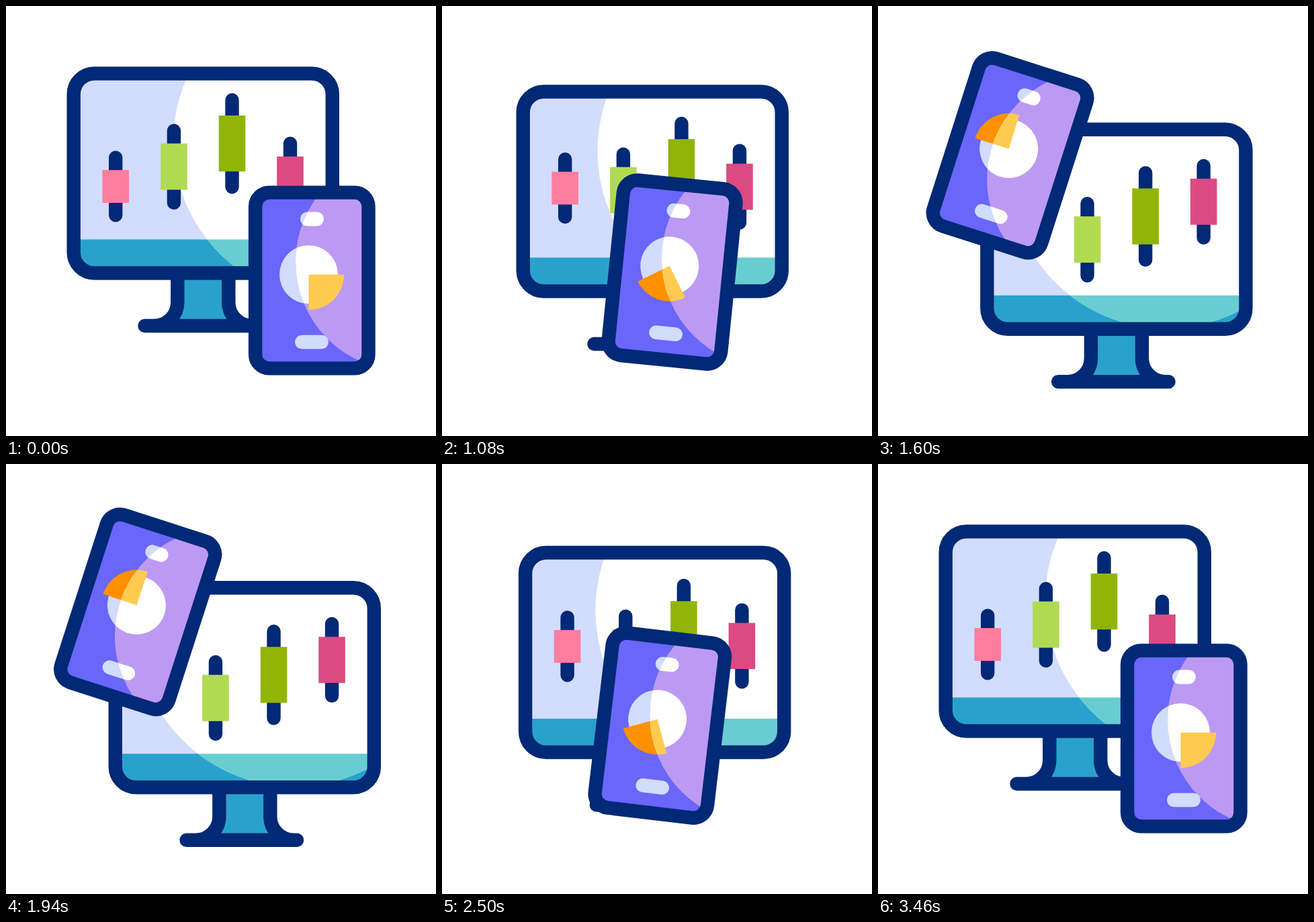
These frames come from a looping animation (640x640 px, 3600 ms). An HTML page:

```html
<!DOCTYPE html>
<html lang="en">
<head>
<meta charset="utf-8">
<title>Trading devices</title>
<style>
  html, body { margin: 0; width: 100%; height: 100%; overflow: hidden; background: #fff; }
  svg { display: block; width: 100vw; height: 100vh; }
  .line { fill: none; stroke: #022975; stroke-width: 20.4; stroke-linecap: round; }
</style>
</head>
<body>
<svg id="stage" viewBox="0 0 640 640"></svg>
<script>
const LOOP = 3600;
const stage = document.getElementById('stage');

// Each surface is drawn twice: plain, and again in lit colours inside a round spot.
const plain = { wall: '#d2dcfd', bar: '#28a2cc', screen: '#6a66f9', pale: '#d2dcfd', slice: '#ff9100' };
const lit = { wall: '#fff', bar: '#68cdd0', screen: '#bc9af3', pale: '#fff', slice: '#fdcb50' };

const wall = c => `<g class="monitor">
  <rect x="101" y="101" width="385" height="296" rx="30" fill="${c.wall}"/>
  <rect x="110" y="347.5" width="366" height="41" fill="${c.bar}"/></g>`;

const screen = c => `<g class="phone">
  <rect x="-84" y="-130" width="168" height="260" rx="20" fill="${c.screen}"/>
  <rect x="-17.3" y="-102" width="35" height="21" rx="10.5" fill="${c.pale}"/>
  <rect x="-25.3" y="81.3" width="50" height="20.6" rx="10.3" fill="${c.pale}"/>
  <circle cx="-4.8" cy="-8.8" r="43.5" fill="${c.pale}"/>
  <g transform="translate(-4.8 -8.8)"><path class="slice" d="M0 0H52.6A52.6 52.6 0 0 1 0 52.6Z" fill="${c.slice}"/></g></g>`;

// centre x, stem top and bottom, body top and bottom, travel, colour
const candles = [
  [163.2, 215.4, 321.6, 244.2, 293, 7.8, '#ff7d9f'],
  [249.9, 175.4, 302.9, 204.6, 273.5, 110, '#b1da53'],
  [336.5, 129.7, 279.4, 163, 246.3, 110, '#90b507'],
  [423, 194.6, 322, 224, 292.6, 33.5, '#dc4a84']
];
const candle = ([x, top, bottom, a, b, , fill]) => `<g class="candle">
  <path class="line" d="M${x} ${top + 10.2}V${bottom - 10.2}"/>
  <rect x="${x - 19.8}" y="${a}" width="39.6" height="${b - a}" fill="${fill}"/></g>`;

stage.innerHTML = `
  <clipPath id="wallSpot"><circle r="235"/></clipPath>
  <clipPath id="screenSpot"><circle r="162"/></clipPath>
  <g class="monitor">
    <path fill="#28a2cc" d="M255.3 400V441Q255.3 462 244 476H342.600Q331.300 462 331.300 441V400Z"/>
    <path class="line" d="M255.3 400V441A35 35 0 0 1 220.3 476M331.3 400V441A35 35 0 0 0 366.300 476M206.500 476H371"/>
  </g>
  ${wall(plain)}
  <g clip-path="url(#wallSpot)">${wall(lit)}</g>
  <g class="monitor"><rect class="line" x="100.700" y="100.500" width="385.100" height="297" rx="30.700"/></g>
  ${candles.map(candle).join('')}
  ${screen(plain)}
  <g clip-path="url(#screenSpot)">${screen(lit)}</g>
  <g class="phone"><rect class="line" x="-84.200" y="-130.900" width="168.400" height="261.800" rx="20.700"/></g>`;

const all = s => [...stage.querySelectorAll(s)];
const parts = {
  monitor: all('.monitor'), phone: all('.phone'), slice: all('.slice'), candle: all('.candle'),
  wallSpot: all('#wallSpot circle')[0], screenSpot: all('#screenSpot circle')[0]
};

// Travel along a curve at a share of its length.
function track(d) {
  const path = document.createElementNS('http://www.w3.org/2000/svg', 'path');
  path.setAttribute('d', d);
  const length = path.getTotalLength();
  return p => path.getPointAtLength(p * length);
}
const phoneAt = track('M455.3 408.5c-165 12 -244 -92 -259.500 -191');
const screenSpotAt = track('M593 380.700c-165 5 -258 -40 -269.500 -127');

// Ease with flat ends, like cubic-bezier(x1, 0, x2, 1).
function ease(u, x1, x2) {
  if (u <= 0) return 0;
  if (u >= 1) return 1;
  let lo = 0, hi = 1;
  for (let i = 0; i < 30; i++) {
    const s = (lo + hi) / 2, r = 1 - s;
    if (3 * r * r * s * x1 + 3 * r * s * s * x2 + s * s * s < u) lo = s; else hi = s;
  }
  return lo * lo * (3 - 2 * lo);
}

const progress = t => t < 1780
  ? ease((t - 150) / 1630, 0.94, 0.395)
  : 1 - ease((t - 1780) / 1690, 0.7, 0.035);

const place = (list, value) => list.forEach(el => el.setAttribute('transform', value));
function centre(circle, x, y) {
  circle.setAttribute('cx', x);
  circle.setAttribute('cy', y);
}

function draw(t) {
  const p = progress(t);
  const dx = 62.5 * p;
  const phone = phoneAt(p), spot = screenSpotAt(p);
  place(parts.monitor, `translate(${dx} ${84.4 * p})`);
  parts.candle.forEach((el, i) => place([el], `translate(${dx} ${candles[i][5] * p})`));
  place(parts.phone, `translate(${phone.x} ${phone.y}) rotate(${18 * p})`);
  place(parts.slice, `rotate(${182 * p})`);
  centre(parts.wallSpot, 484 - 55.2 * p, 202 + 43.5 * p);
  centre(parts.screenSpot, spot.x, spot.y);
}

const start = performance.now();
function tick() {
  draw((performance.now() - start) % LOOP);
  requestAnimationFrame(tick);
}
tick();
</script>
</body>
</html>
```
